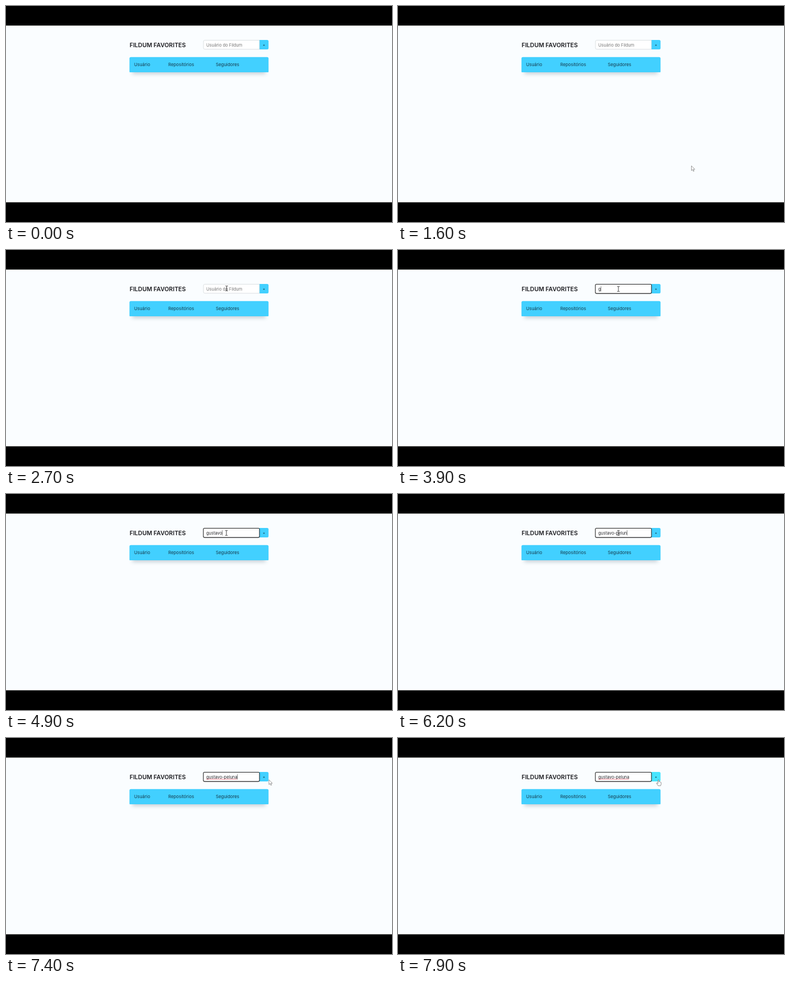
An HTML page for the animation above (8 s loop, 690x388 px).

```html
<!DOCTYPE html>
<html lang="pt-BR">
<head>
<meta charset="utf-8">
<title>Favorites</title>
<style>
  html, body { margin: 0; width: 100%; height: 100%; overflow: hidden; background: #000; }
  svg { display: block; width: 100%; height: 100%; }
  text { font-family: Inter, "Open Sans", sans-serif; white-space: pre; }
  .title { font-size: 10.55px; font-weight: 600; fill: #1b1b1f; }
  .head { font-size: 7.85px; fill: #163a4a; }
  .field { font-size: 7.5px; }
</style>
</head>
<body>
<svg viewBox="0 0 690 388">
  <defs>
    <filter id="blur" x="-10%" y="-80%" width="120%" height="260%">
      <feGaussianBlur stdDeviation="3.8"/>
    </filter>
  </defs>
  <rect width="690" height="388" fill="#000"/>
  <rect y="35.3" width="690" height="317.3" fill="#fafdff"/>
  <rect y="35.3" width="690" height="1.2" fill="#eaecec"/>

  <text class="title" x="221" y="73.5">FILDUM FAVORITES</text>

  <path id="button" d="M453 61h13.8a2.5 2.5 0 0 1 2.5 2.5v12a2.5 2.5 0 0 1-2.5 2.5H453z"/>
  <text x="461" y="71.7" text-anchor="middle" font-size="5.4" font-weight="700" fill="#12303d">+</text>
  <path id="box" d="M453 61.5H355.5a2.5 2.5 0 0 0-2.5 2.5v11.2a2.5 2.5 0 0 0 2.5 2.5H453z" fill="#fff"/>
  <rect id="ring" x="352.8" y="61.5" width="100.3" height="16.6" rx="2" fill="none" stroke="#1c1c1c" stroke-width="1.05"/>
  <text id="hint" class="field" x="358" y="72.5" fill="#757575">Usuário do Fildum</text>
  <text id="typed" class="field" x="358" y="72.5" fill="#2a2a2e"></text>
  <path id="squiggle" fill="none" stroke="#e2374a" stroke-width=".7"/>
  <rect id="caret" y="65.2" width=".6" height="9.3" fill="#333"/>

  <rect x="226" y="104" width="238" height="18" fill="#24455c" opacity=".25" filter="url(#blur)"/>
  <path d="M220.7 94.2a2.5 2.5 0 0 1 2.5-2.5h243.6a2.5 2.5 0 0 1 2.5 2.5V118a1 1 0 0 1-1 1H221.7a1 1 0 0 1-1-1z" fill="#42d0ff"/>
  <text class="head" x="229" y="108.3">Usuário</text>
  <text class="head" x="290" y="108.3">Repositórios</text>
  <text class="head" x="375" y="108.3">Seguidores</text>

  <g id="pointer">
    <path id="arrow" d="M0 0V8.6L2 6.8L3.4 10L4.8 9.4L3.4 6.3H6.1Z" fill="#fff" stroke="#666" stroke-width=".65" stroke-linejoin="round"/>
    <path id="beam" d="M-2.2-4.4H-.6L0-4L.6-4.4H2.2M0-4V4M-2.2 4.4H-.6L0 4L.6 4.4H2.2" fill="none" stroke="#222" stroke-width=".85"/>
    <path id="hand" d="M-.8 .6Q-.8 0 0 0T.9 .7V3.6Q1.7 3 2.3 3.9Q3.2 3.4 3.7 4.3Q4.8 4.1 4.8 5.3V7.6Q4.8 9 3.8 10.8H-.4Q-1.4 9.2-3.2 6.8Q-3.7 5.6-2.6 5.5L-.8 6.8Z" fill="#fff" stroke="#555" stroke-width=".65" stroke-linejoin="round"/>
  </g>
</svg>
<script>
const LOOP = 8000, STEP = 100;
const FOCUS = 3000, CLICK = 3150, SPELL = 6600, BLINK = 530;
const user = 'gustavo-peluna';
const keys = [3900, 4000, 4100, 4200, 4300, 4500, 4800,
              5100, 5300, 5400, 5500, 6000, 6200, 6300];
// time, x, y
const path = [
  [1300, 152, 326], [1600, 524.5, 287], [2100, 482, 187], [2700, 394.5, 69],
  [2800, 394, 70], [6500, 394, 70], [6900, 454, 73], [7100, 471, 78],
  [7400, 470, 75], [7500, 468, 75], [7900, 465.5, 75]
];

const el = id => document.getElementById(id);
const show = (id, on) => el(id).setAttribute('visibility', on ? 'visible' : 'hidden');
const inside = (p, x0, x1) => p.x >= x0 && p.x < x1 && p.y >= 61 && p.y < 78;

function pointerAt(t) {
  const i = path.findIndex(p => p[0] >= t);
  if (i < 1) {
    const p = path[i < 0 ? path.length - 1 : 0];
    return { x: p[1], y: p[2] };
  }
  const [t0, x0, y0] = path[i - 1], [t1, x1, y1] = path[i];
  const k = (t - t0) / (t1 - t0);
  return { x: x0 + (x1 - x0) * k, y: y0 + (y1 - y0) * k };
}

function wave(x, width, y) {
  let d = `M${x} ${y}`;
  for (let i = 1; i <= width; i++) d += `L${x + i} ${y + (i % 2 ? -0.5 : 0.5)}`;
  return d;
}

function drawField(t) {
  const focused = t >= FOCUS;
  const count = keys.filter(k => k <= t).length;
  const typed = el('typed');
  typed.textContent = user.slice(0, count);
  const width = count ? typed.getComputedTextLength() : 0;

  show('hint', !count);
  show('ring', focused);
  el('box').setAttribute('stroke', focused ? 'none' : '#d3d8db');
  el('box').setAttribute('stroke-width', 0.8);

  const since = t - (count ? keys[count - 1] : CLICK);
  show('caret', since >= 0 && since % (2 * BLINK) < BLINK);
  el('caret').setAttribute('x', 358 + width);

  show('squiggle', t >= SPELL);
  el('squiggle').setAttribute('d', wave(358, width, 74));
}

function drawPointer(t) {
  const on = t >= path[0][0];
  const p = pointerAt(t);
  const overField = inside(p, 353, 453), overButton = inside(p, 453, 469);
  el('pointer').setAttribute('transform', `translate(${p.x} ${p.y})`);
  show('beam', on && overField);
  show('hand', on && overButton);
  show('arrow', on && !overField && !overButton);
  el('button').setAttribute('fill', on && overButton ? '#49e5ff' : '#42d0ff');
}

function draw(time) {
  const t = Math.floor((time % LOOP) / STEP) * STEP;
  drawField(t);
  drawPointer(t);
}

const start = performance.now();
function tick() {
  draw(performance.now() - start);
  requestAnimationFrame(tick);
}
tick();
</script>
</body>
</html>
```
